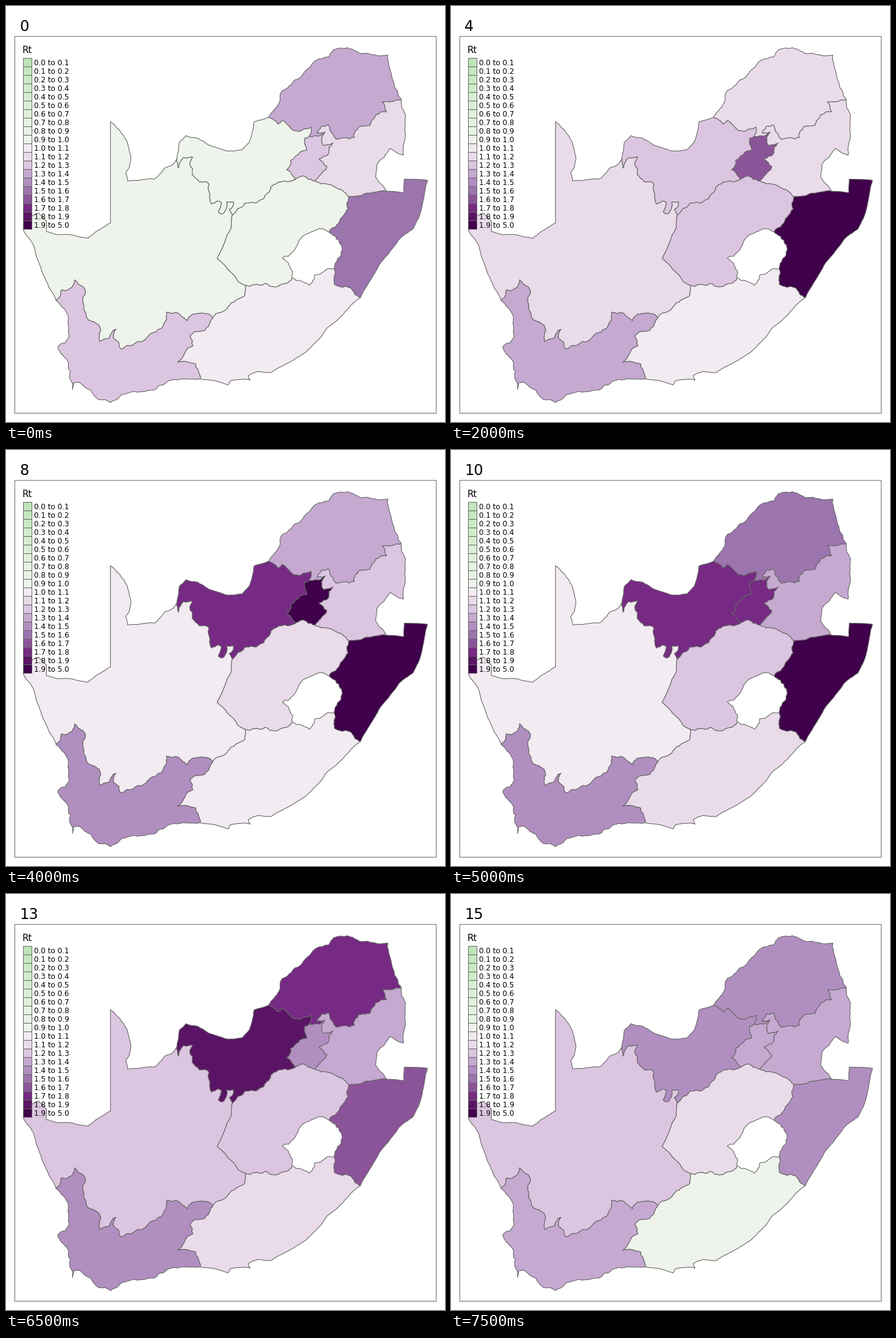
These frames come from a looping animation (720x681 px, 8 s). A matplotlib script:

```python
import numpy as np
import matplotlib.pyplot as plt
from matplotlib.animation import FuncAnimation
from matplotlib.colors import LinearSegmentedColormap
from matplotlib.patches import Polygon, Rectangle

W, H, DPI = 720, 681, 100
PX = 72 / DPI
EDGE = "#666666"
STEPS = 16
rng = np.random.default_rng(4)

greens = LinearSegmentedColormap.from_list("g", ["#bfe5b9", "#d9f0d3", "#eef3eb"])
PALETTE = [greens(i / 9) for i in range(10)] + [
    "#f2ebf1", "#e9dbe9", "#dcc5e0", "#c5a9d1", "#b18ec0",
    "#9c74ae", "#8b5499", "#762a83", "#5a1465", "#40004b"]


def arc(*xy, rough=0.1):
    """Border through key points, broken up by midpoint displacement."""
    p = np.reshape(xy, (-1, 2)).astype(float)
    for _ in range(3):
        d = np.diff(p, axis=0)
        normal = np.c_[-d[:, 1], d[:, 0]]
        shift = np.clip(rng.normal(0, rough, len(d)), -0.16, 0.16)
        mid = (p[:-1] + p[1:]) / 2 + normal * shift[:, None]
        p = np.insert(p, range(1, len(p)), mid, axis=0)
    return p


def ring(*arcs):
    return np.vstack(arcs)


def levels(keys):
    """Colour class for every step, interpolated between key steps."""
    return np.rint(np.interp(range(STEPS), list(keys), list(keys.values()))).astype(int)


# Outer borders and coasts
nc_coast = arc(82, 482, 60, 438, 47, 399, 28, 366, 42, 344, 53, 339, 66, 352,
               66, 369, 84, 374, 134, 380, 149, 368, 171, 355, rough=0.03)
nc_north = arc(171, 189, 186, 203, 204, 244, 196, 273, 199, 286, 243, 283,
               260, 265, 280, 250, rough=0.05)
nw_north = arc(280, 250, 284, 223, 295, 212, 314, 216, 334, 228, 362, 237,
               387, 235, 399, 222, 407, 189, 430, 182, rough=0.03)
lp_north = arc(430, 182, 448, 158, 453, 138, 482, 117, 506, 90, 529, 83,
               537, 71, 560, 68, 593, 77, 626, 80, 636, 126, 648, 153, rough=0.06)
mp_east = arc(648, 153, 655, 178, 655, 210, 651, 244, 630, 233, 608, 259,
              606, 280, 624, 303, rough=0.04)
kzn_coast = arc(624, 303, 652, 305, 653, 283, 691, 285, 684, 318, 677, 345,
                667, 365, 644, 382, 615, 419, 599, 446, 581, 477, rough=0.02)
ec_coast = arc(318, 610, 364, 620, 368, 613, 400, 612, 397, 605, 413, 598,
               434, 600, 470, 580, 508, 550, 542, 515, 581, 477, rough=0.03)
wc_coast = arc(82, 482, 102, 511, 104, 540, 85, 557, 94, 573, 106, 598,
               109, 627, 110, 617, 121, 616, 139, 629, 171, 649, 204, 632,
               247, 626, 275, 611, 318, 610)

# Inner borders
nc_nw = arc(280, 250, 282, 265, 290, 248, 306, 247, 301, 257, 305, 275,
            333, 292, 337, 324, 353, 321, 348, 336, 354, 340, 362, 320,
            373, 321, 366, 333, 371, 342)
nc_fs = arc(371, 342, 369, 363, 346, 413, 368, 435, 381, 451, 392, 457, rough=0.03)
nc_ec = arc(392, 457, 391, 474, 364, 492, 339, 510)
wc_nc = arc(82, 482, 90, 465, 107, 461, 112, 448, 130, 465, 135, 514,
            152, 522, 153, 549, 180, 529, 175, 542, 188, 561, 203, 556,
            236, 537, 254, 528, 263, 501, 297, 515, 306, 504, 330, 503, 339, 510)
wc_ec = arc(339, 510, 332, 524, 301, 540, 306, 556, 281, 583, 311, 586, 318, 610)
nw_lp = arc(430, 182, 446, 193, 453, 187, 468, 201, 500, 198, 497, 213)
lp_mp = arc(648, 153, 617, 157, 624, 173, 606, 178, 597, 195, 579, 197,
            571, 215, 541, 218, 535, 208, 529, 195, 517, 197, 510, 208, 523, 206)
lp_gt = arc(497, 213, 511, 213, 523, 206)
gt_mp = arc(523, 206, 518, 213, 520, 228, 536, 224, 528, 242, 513, 251,
            526, 263, 514, 277, 504, 286)
nw_gt = arc(474, 284, 460, 268, 467, 252, 493, 236, 490, 216, 497, 213)
gt_fs = arc(474, 284, 490, 279, 504, 286)
fs_nw = arc(371, 342, 391, 323, 421, 316, 434, 296, 457, 286, 474, 284)
fs_mp = arc(504, 286, 529, 292, 549, 300, 562, 312)
fs_kzn = arc(562, 312, 561, 332, 546, 354, 530, 370)
fs_ec = arc(469, 445, 446, 459, 424, 454, 392, 457)
fs_hole = arc(530, 370, 515, 364, 480, 384, 453, 412, 468, 432, 469, 445)
ec_hole = arc(469, 445, 497, 457, 506, 440, 538, 429)
kzn_hole = arc(530, 370, 546, 384, 551, 399, 538, 429)
kzn_ec = arc(538, 429, 538, 455, 565, 461, 581, 477)
mp_kzn = arc(624, 303, 588, 307, 562, 312, rough=0.05)

# Province outline and its {step: colour class} keys
PROVINCES = [(outline, levels(keys)) for outline, keys in [
    (ring(nc_coast, nc_north, nc_nw, nc_fs, nc_ec, wc_nc[::-1]),
     {0: 9, 2: 11, 5: 11, 6: 10, 10: 10, 13: 12}),
    (ring(nw_north, nw_lp, nw_gt[::-1], fs_nw[::-1], nc_nw[::-1]),
     {0: 9, 3: 12, 6: 13, 9: 18, 8: 17} and
     {0: 9, 3: 12, 6: 13, 8: 17, 9: 18, 10: 17, 11: 17, 13: 18, 15: 14}),
    (ring(lp_north, lp_mp, lp_gt[::-1], nw_lp[::-1]),
     {0: 13, 6: 10, 8: 13, 12: 17, 13: 17, 15: 14}),
    (ring(mp_east, mp_kzn, fs_mp[::-1], gt_mp[::-1], lp_mp[::-1]),
     {6: 11, 9: 13}),
    (ring(fs_nw, gt_fs, fs_mp, fs_kzn, fs_hole, fs_ec, nc_fs[::-1]),
     {0: 9, 2: 12, 7: 12, 8: 11, 9: 12, 14: 12, 15: 11}),
    (ring(ec_hole, kzn_ec, ec_coast[::-1], wc_ec[::-1], nc_ec[::-1], fs_ec[::-1]),
     {2: 10, 3: 9, 4: 10, 8: 10, 9: 11, 10: 11, 11: 10, 12: 11, 13: 11, 14: 9}),
    (ring(wc_nc, wc_ec, wc_coast[::-1]),
     {1: 12, 2: 13, 6: 13, 7: 14, 13: 14, 14: 13}),
    (ring(kzn_coast, kzn_ec[::-1], kzn_hole[::-1], fs_kzn[::-1], mp_kzn[::-1]),
     {0: 15, 4: 19, 5: 18, 6: 19, 11: 19, 13: 16, 15: 14}),
    (ring(lp_gt, gt_mp, gt_fs[::-1], nw_gt),
     {0: 12, 7: 19, 8: 19, 13: 14, 15: 13}),
]]

plt.rcParams["font.family"] = "DejaVu Sans"
fig = plt.figure(figsize=(W / DPI, H / DPI), dpi=DPI, facecolor="white")
ax = fig.add_axes([0, 0, 1, 1])
ax.set_xlim(0, W)
ax.set_ylim(H, 0)
ax.axis("off")


def label(x, y, text, size):
    return ax.text(x, y, text, fontsize=size * PX, va="baseline")


def box(x, y, w, h, color="none"):
    ax.add_patch(Rectangle((x, y), w, h, fc=color, ec=EDGE, lw=PX, snap=False))


shapes = [ax.add_patch(Polygon(outline + 0.3, ec=EDGE, lw=1.1 * PX, joinstyle="round"))
          for outline, _ in PROVINCES]
box(14.4, 49.8, 691.2, 616.8)

label(27, 77, "Rt", 15)
for i, color in enumerate(PALETTE):
    box(28.5, 85.6 + 14 * i, 14, 14, color)
    top = 5.0 if i == 19 else (i + 1) / 10
    label(46, 97 + 14 * i, f"{i / 10:.1f} to {top:.1f}", 12)
title = label(22, 41, "0", 24)


def draw(step):
    title.set_text(str(step))
    for shape, (_, classes) in zip(shapes, PROVINCES):
        shape.set_facecolor(PALETTE[classes[step]])
    return [title, *shapes]


anim = FuncAnimation(fig, draw, frames=STEPS, interval=1000 // 2, repeat=True,
                     repeat_delay=0, blit=False)
plt.show()
```
